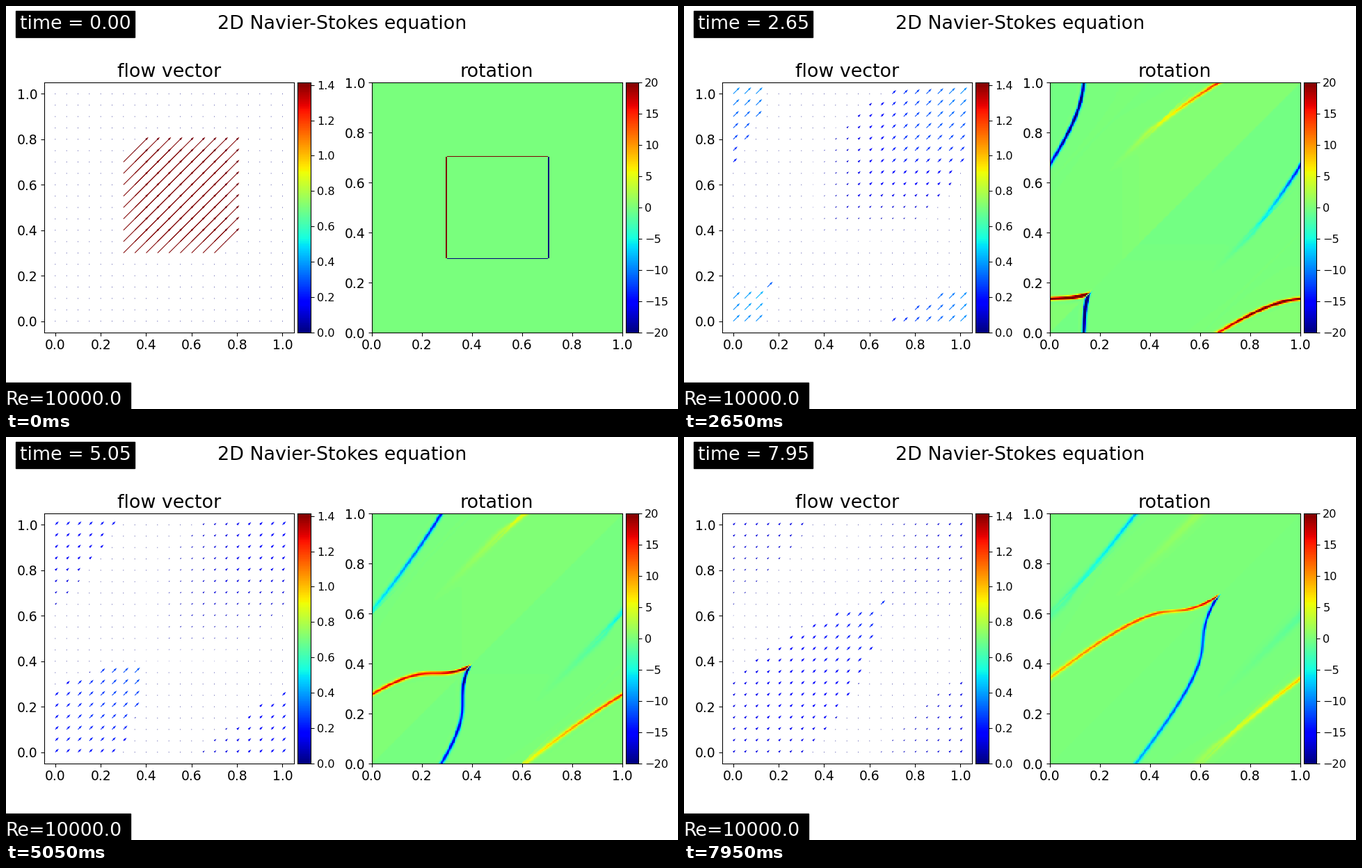
Write a matplotlib script that moves like this. It is 966 by 580 pixels and loops after 8000 ms.

```python
import numpy as np
import matplotlib.pyplot as plt
from matplotlib.animation import FuncAnimation

plt.rcParams["font.family"] = "DejaVu Sans"

W, H, DPI = 966, 580, 96
FRAMES, STEP = 160, 50
N = 201
NU = 1e-4
LO, HI = 0.3, 0.7
BIG, MID, SMALL = 20.12, 14.08, 12.07

# Two periods in each direction, folded back into one later
axis = (np.arange(2 * N) + 0.5) / N
gx, gy = np.meshgrid(axis, axis)
along = np.minimum(gx, gy)
offset = np.abs(gx - gy)
fine = np.linspace(0, 0.6, 601)


def front_paths(substeps=10):
    """Front position per frame, for each distance from the diagonal."""
    boost = 1 + 18 * fine**2 * np.maximum(0.4 - fine, 0)
    s = HI - fine
    dt = STEP / 1000 / substeps
    paths = []
    for n in range(FRAMES * substeps):
        if n % substeps == 0:
            paths.append(s.copy())
        t = max(n * dt, 1e-6)
        behind = np.clip((s - LO) / t, 0, 1)
        ahead = np.clip((s - 1 - LO) / t, 0, 1)
        s += dt * (boost * (0.04 + 0.215 * behind) + 0.5 * ahead)
    return paths


def sigmoid(x):
    return 1 / (1 + np.exp(-np.clip(x, -50, 50)))


def velocity(t, path):
    """Rarefaction fan ended by a travelling front, on the periodic grid."""
    t = max(t, 1e-6)
    slope = np.gradient(path, fine)
    jump = np.clip((path - LO) / t, 0.03, 1)
    width = (0.006 + 0.0007 / jump) * (min(1, 20 * t) + 1e-3)
    scale = np.hypot(slope, 1 + slope) * width

    # Past the last tabulated offset the front keeps falling back
    front = np.interp(offset, fine, path) - np.maximum(offset - fine[-1], 0)
    dist = (along - front) / np.interp(offset, fine, scale)
    foot = 2 * np.sqrt(NU * t)
    fan = np.minimum(foot * np.logaddexp(0, (along - LO) / foot) / t, 1)
    fan *= sigmoid((0.41 - offset) / (0.2 * foot))
    bump = 0.1 * np.interp(offset, fine, jump)
    bump *= np.exp(-np.clip(dist + 1, -7, 7) ** 2)
    u = fan * (sigmoid(-4 * dist) + bump)
    return u.reshape(2, N, 2, N).max(axis=(0, 2))


def rotation(u, t):
    ux = np.roll(u, -1, 1) - np.roll(u, 1, 1)
    uy = np.roll(u, -1, 0) - np.roll(u, 1, 0)
    rot = (ux - uy) * N / 2
    if t == 0:
        rot[u > 0.01] = 0
    return rot


fig = plt.figure(figsize=(W / DPI, H / DPI), dpi=DPI, facecolor="white")


def panel(x0, x1, y0=110, y1=470):
    return fig.add_axes([x0 / W, 1 - y1 / H, (x1 - x0) / W, (y1 - y0) / H])


def colour_bar(x0, x1, low, high, ticks):
    ax = panel(x0, x1)
    ax.imshow(np.linspace(0, 1, 256)[:, None], cmap="jet", origin="lower",
              aspect="auto", extent=(0, 1, low, high), interpolation="nearest")
    ax.set_xticks([])
    ax.yaxis.tick_right()
    ax.set_yticks(ticks)
    ax.tick_params(labelsize=SMALL)


def label(x, base, text, pad=None, **kw):
    box = dict(facecolor="black", edgecolor="black", pad=pad) if pad else None
    return fig.text(x / W, 1 - base / H, text, fontsize=BIG,
                    va="baseline", bbox=box, **kw)


fifths = np.arange(6) / 5
flow_ax = panel(54.5, 413.8)
rot_ax = panel(525.5, 885.5)
for ax, name in ((flow_ax, "flow vector"), (rot_ax, "rotation")):
    ax.set_title(name, fontsize=BIG)
    ax.tick_params(labelsize=MID)

spots = np.arange(21) / 20
still = np.zeros((21, 21))
arrows = flow_ax.quiver(spots, spots, still, still, still, cmap="jet", scale=10)
arrows.set_clim(0, np.sqrt(2))
flow_ax.set(xlim=(-0.05, 1.05), ylim=(-0.05, 1.05), xticks=fifths, yticks=fifths)

field = rot_ax.imshow(np.zeros((N, N)), cmap="jet", vmin=-20, vmax=20,
                      origin="lower", extent=(0, 1, 0, 1), aspect="auto",
                      interpolation="nearest")
rot_ax.set(xticks=fifths, yticks=fifths)

colour_bar(419, 437.5, 0, np.sqrt(2), np.arange(8) / 5)
colour_bar(891, 909, -20, 20, np.arange(-20, 21, 5))

label(W / 2, 33, "2D Navier-Stokes equation", ha="center")
label(-0.5, 574.5, "Re=10000.0", pad=9, color="white")
clock = label(19.7, 33, "time = 0.00", pad=4.2, color="white")

paths = front_paths()


def draw(i):
    t = i * STEP / 1000
    u = velocity(t, paths[i])
    field.set_data(rotation(u, t))
    s = u[::10, ::10]
    arrows.set_UVC(s, s, s * np.sqrt(2))
    clock.set_text(f"time = {t:.2f}")
    return field, arrows, clock


anim = FuncAnimation(fig, draw, frames=FRAMES, interval=STEP,
                     repeat=True, repeat_delay=0)
plt.show()
```
